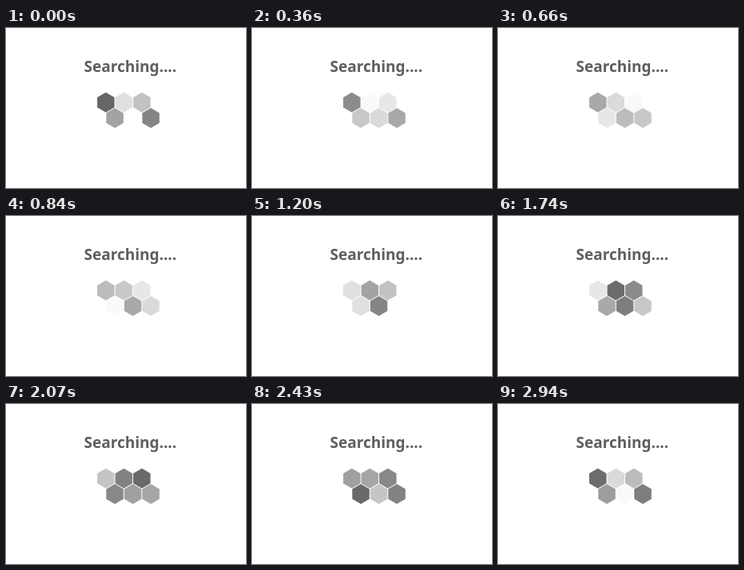
An HTML page that plays this animation: 300x200 px, repeating every 3000 ms.

```html
<!DOCTYPE html>
<html lang="en">
<head>
<meta charset="utf-8">
<title>Searching</title>
<style>
  html, body { margin: 0; width: 100%; height: 100%; overflow: hidden; background: #fff; }
  svg { display: block; width: 100%; height: 100%; }
  text { font: bold 19px "Noto Sans", sans-serif; fill: #5d605d; }
</style>
</head>
<body>
<svg viewBox="0 0 300 200">
  <text x="97.5" y="55">Searching....</text>
  <g id="cells"></g>
</svg>
<script>
const LOOP = 3000, TICK = 30, DARK = 102;
const RADIUS = 12.4, PITCH_X = 22.5, PITCH_Y = 19.5;
const LEFT = 124.8, TOP = 93;

// column, row and the moment (ms) at which the cell has faded to white
const cells = [
  [0, 0, 1500], [1, 0, 300], [2, 0, 600],
  [0.5, 1, 900], [1.5, 1, 0], [2.5, 1, 1200]
].map(([col, row, whiteAt]) => ({
  el: addHexagon(LEFT + col * PITCH_X, TOP + row * PITCH_Y),
  whiteAt
}));

function addHexagon(cx, cy) {
  const el = document.createElementNS("http://www.w3.org/2000/svg", "polygon");
  const points = Array.from({ length: 6 }, (_, i) => {
    const a = (i + 0.5) * Math.PI / 3;
    return (cx + RADIUS * Math.cos(a)).toFixed(2) + "," + (cy + RADIUS * Math.sin(a)).toFixed(2);
  });
  el.setAttribute("points", points.join(" "));
  document.getElementById("cells").append(el);
  return el;
}

// Linear fade: white at whiteAt, darkest half a loop later
function draw(ms) {
  const t = Math.floor((ms % LOOP) / TICK) * TICK;
  for (const { el, whiteAt } of cells) {
    const phase = ((t - whiteAt + LOOP) % LOOP) / LOOP;
    const strength = 1 - Math.abs(1 - 2 * phase);
    const grey = Math.round(255 - (255 - DARK) * strength);
    el.setAttribute("fill", `rgb(${grey},${grey},${grey})`);
  }
}

const start = performance.now();
function frame() {
  draw(performance.now() - start);
  requestAnimationFrame(frame);
}
frame();
</script>
</body>
</html>
```
